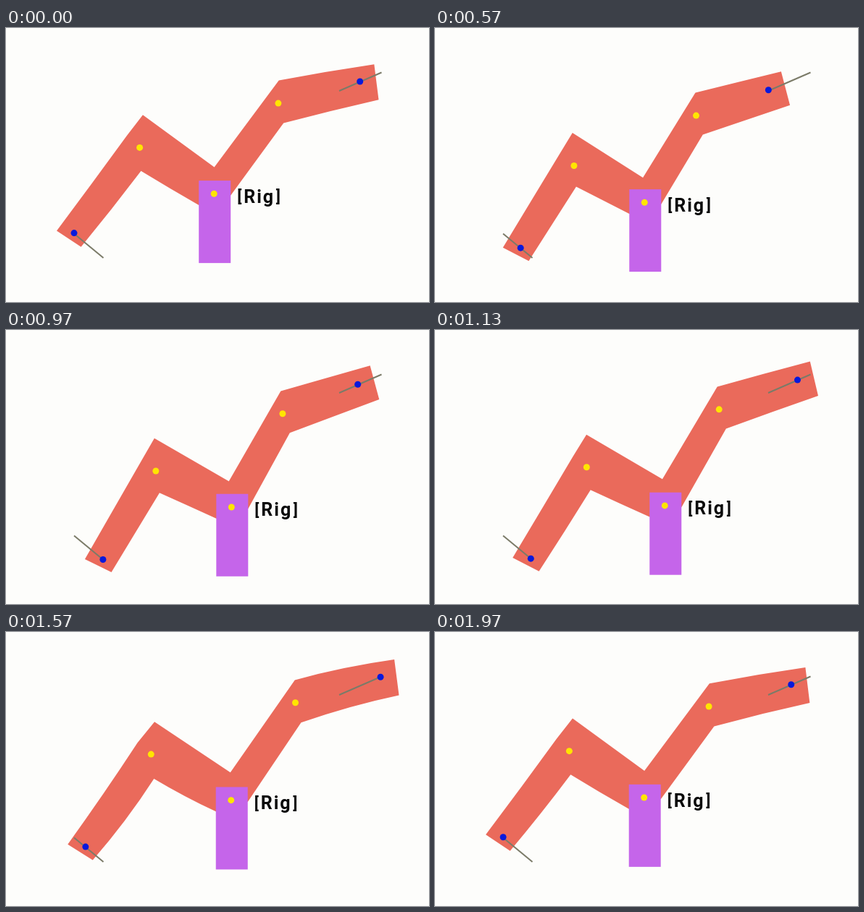
Recreate the animation shown at these times as an HTML page with a canvas. Size 584x379 px, loop 2.01 s.

```html
<!DOCTYPE html>
<html lang="en">
<head>
<meta charset="utf-8">
<title>Rig</title>
<style>
  html, body { margin: 0; width: 100%; height: 100%; overflow: hidden; background: #fdfdfb; }
  canvas { display: block; width: 584px; height: 379px; }
</style>
</head>
<body>
<canvas id="stage" width="584" height="379"></canvas>
<script>
const ctx = document.getElementById('stage').getContext('2d');
const LOOP = 2010, STEPS = 60;

// Each point swings as mid + c*cos + s*sin: [x mid, c, s, y mid, c, s]
const swings = {
  handL:    [114, -20, 0, 300.6, -17, 0],
  handR:    [488.7, 0, -29, 74, 0, 12],
  elbowL:   [196.1, -11.5, -6.7, 179.8, -14.4, 7.9],
  elbowR:   [380, -4.1, -20.8, 109.4, -5.3, 10.8],
  hub:      [300, -12.8, -13.7, 237, -7.7, 2.8],
  tipLTop:  [89.5, -19.5, 0.2, 298.7, -18.3, 1.2],
  tipLLow:  [124.6, -21, 0.5, 318.9, -16.2, 0],
  bendLTop: [197.4, -8.5, -9.6, 134.6, -14.4, 7.6],
  bendLLow: [199.6, -13.2, -7.6, 211.3, -13.5, 5.6],
  notch:    [298.4, -10.8, -13.9, 200.6, -8.2, 4.8],
  bendRTop: [379.1, -2.4, -20.6, 77.9, -5.5, 10.6],
  bendRLow: [388.6, -5.4, -20.4, 136.4, -4.8, 10.3],
  tipRTop:  [507, 1.3, -29.5, 49.2, 1.1, 11.6],
  tipRLow:  [516.3, -1.8, -27.2, 97.1, 2.1, 10.3]
};

function poseAt(a) {
  const c = Math.cos(a), s = Math.sin(a), pose = {};
  for (const [name, k] of Object.entries(swings)) {
    pose[name] = [k[0] + k[1] * c + k[2] * s, k[3] + k[4] * c + k[5] * s];
  }
  return pose;
}

const shift = ([x, y], dx, dy) => [x + dx, y + dy];
const between = (p, q, f) => [p[0] + (q[0] - p[0]) * f, p[1] + (q[1] - p[1]) * f];

// Curve whose middle lies (dx, dy) off the straight line
function bow(from, to, dx, dy) {
  const control = shift(between(from, to, 0.5), 2 * dx, 2 * dy);
  ctx.quadraticCurveTo(...control, ...to);
}

function dot([x, y], color) {
  ctx.fillStyle = color;
  ctx.beginPath();
  ctx.arc(x, y, 4.5, 0, Math.PI * 2);
  ctx.fill();
}

function track(x1, y1, x2, y2) {
  ctx.beginPath();
  ctx.moveTo(x1, y1);
  ctx.lineTo(x2, y2);
  ctx.stroke();
}

function drawArms(p, bend) {
  const armpitR = shift(p.hub, 23, 2.3), armpitL = shift(p.hub, -21, 15.7);
  const kink = shift(between(p.tipLTop, p.bendLTop, 0.82), -bend * 0.9, -bend * 0.6);
  ctx.fillStyle = '#ea6a5b';
  ctx.beginPath();
  ctx.moveTo(...p.tipLTop);
  bow(p.tipLTop, kink, bend * 0.4, bend * 0.2);
  ctx.lineTo(...p.bendLTop);
  ctx.lineTo(...p.notch);
  ctx.lineTo(...p.bendRTop);
  bow(p.bendRTop, p.tipRTop, -bend * 0.2, -bend);
  ctx.lineTo(...p.tipRLow);
  bow(p.tipRLow, p.bendRLow, -bend * 0.3, -bend);
  ctx.lineTo(...armpitR);
  ctx.lineTo(...armpitL);
  bow(armpitL, p.bendLLow, -bend * 0.25, bend * 0.5);
  bow(p.bendLLow, p.tipLLow, bend, bend * 0.6);
  ctx.closePath();
  ctx.fill();
}

function drawLabel([x, y]) {
  ctx.fillStyle = '#0a0a0a';
  ctx.font = '700 22px Roboto, Arial, sans-serif';
  ctx.letterSpacing = '0px';
  ctx.fillText('[', x + 32, y + 11);
  ctx.fillText(']', x + 85.5, y + 11);
  ctx.font = '600 25px Roboto, Arial, sans-serif';
  ctx.letterSpacing = '2px';
  ctx.fillText('Rig', x + 41, y + 12.5);
}

function draw(a) {
  const p = poseAt(a);
  const bend = 2.2 * Math.max(0, Math.cos(a + 1.3));
  ctx.fillStyle = '#fdfdfb';
  ctx.fillRect(0, 0, 584, 379);

  drawArms(p, bend);
  ctx.fillStyle = '#c565ea';
  ctx.fillRect(p.hub[0] - 21, p.hub[1] - 18.2, 44, 114);

  ctx.strokeStyle = '#7b7b68';
  ctx.lineWidth = 2;
  track(94, 284.5, 134.5, 318);
  track(460, 87, 518.5, 61.5);

  for (const name of ['elbowL', 'hub', 'elbowR']) dot(p[name], '#ffe500');
  for (const name of ['handL', 'handR']) dot(p[name], '#0719dc');
  drawLabel(p.hub);
}

// Thirty steps a second on a 10 ms clock; the last step holds a little longer
function stepAt(t) {
  const tick = Math.floor(t / 10) * 10;
  return Math.min(STEPS - 1, Math.floor((tick + 3.5) * 0.03));
}

const start = performance.now();
function frame() {
  const t = (performance.now() - start) % LOOP;
  draw(stepAt(t) / STEPS * Math.PI * 2);
  requestAnimationFrame(frame);
}
frame();
</script>
</body>
</html>
```
